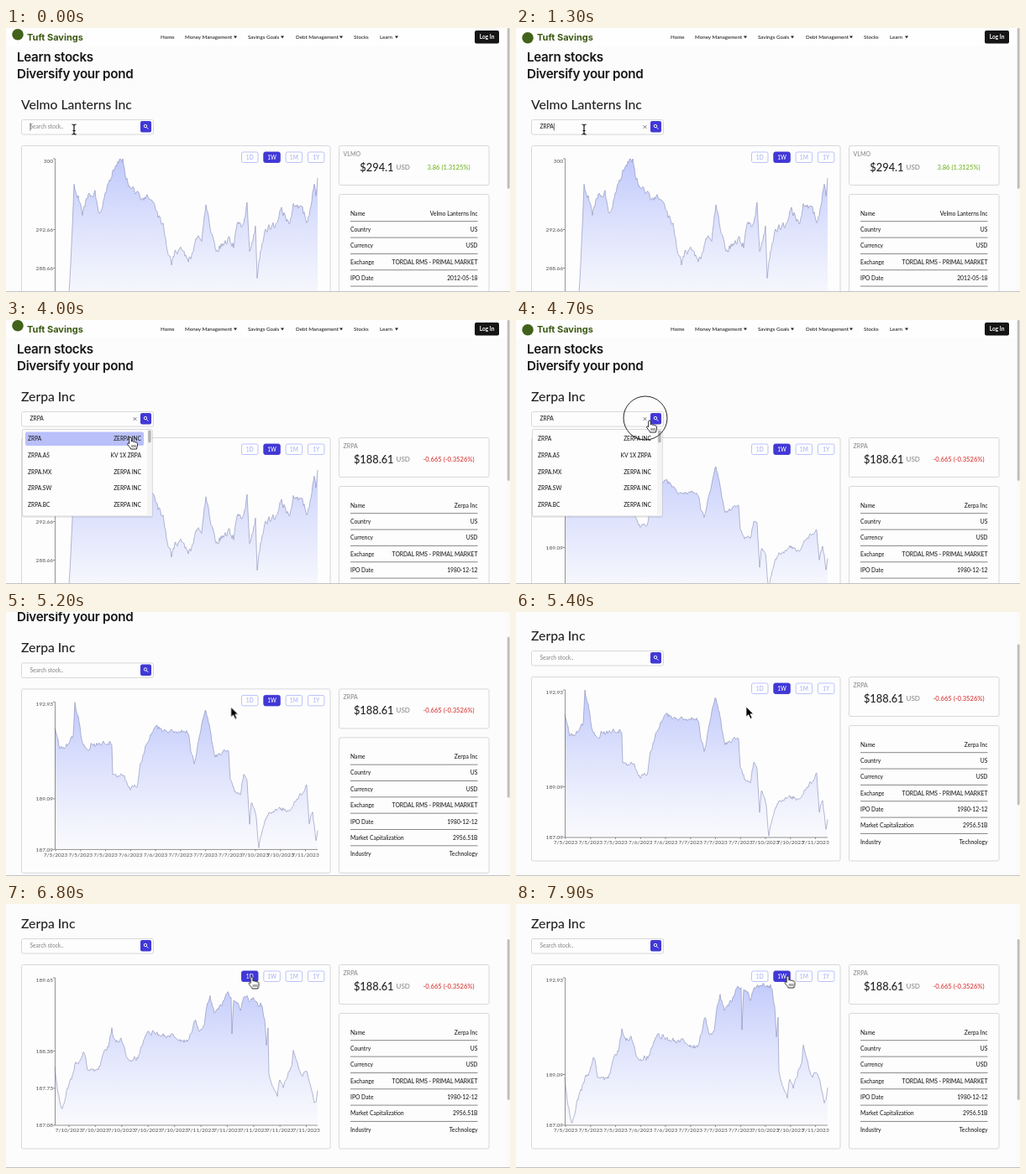
These frames come from a looping animation (600 by 315 pixels, 8000 ms). An HTML page:

```html
<!DOCTYPE html>
<html lang="en">
<head>
<title>Stock search</title>
<style>
  html, body { margin: 0; width: 100%; height: 100%; overflow: hidden; background: #fcfcfc; }
  svg { display: block; width: 600px; height: 315px; font: 500 6.6px Lato, sans-serif; fill: #222; }
  .card { fill: #fdfdfd; stroke: #cfcfd2; stroke-width: .8; }
  .title { font: 600 15.2px Inter, sans-serif; letter-spacing: -.3px; fill: #161616; }
  .brand { font: 700 11px Inter, sans-serif; fill: #3c5a14; }
  .end { text-anchor: end; }
  .mid { text-anchor: middle; }
  .soft { fill: #8a8a8e; }
  .axis { stroke: #666; stroke-width: .7; fill: none; }
  .labels { fill: #5c5c60; font-size: 6.5px; }
  .range rect { fill: #fefefe; stroke: #b5bbfa; stroke-width: .9; }
  .range text { fill: #aab1f8; text-anchor: middle; }
  .range.on rect { fill: #4138d6; stroke: #4138d6; }
  .range.on text { fill: #fff; }

  #page, #thumb, #cursor, #badge { animation: 8s ease-in-out infinite; }
  #page { animation-name: scroll; }
  #thumb { animation-name: thumb; }
  #cursor { animation-name: point; }
  #badge { animation-name: hop; }
  @keyframes scroll {
    0%, 61% { transform: translateY(0); }
    67%, 68.5% { transform: translateY(-63px); }
    70.5%, 100% { transform: translateY(-68px); }
  }
  @keyframes thumb {
    0%, 61% { transform: translateY(0); }
    67%, 68.5% { transform: translateY(38.5px); }
    70.5%, 100% { transform: translateY(42px); }
  }
  @keyframes hop {
    0% { transform: translateY(-4px); }
    2.5% { transform: translateY(-5px); }
    10%, 40% { transform: translateY(0); }
    45% { transform: translateY(-4px); }
    50% { transform: translateY(-5px); }
    58%, 100% { transform: translateY(0); }
  }
  @keyframes point {
    0%, 22% { transform: translate(81px, 121px); }
    31% { transform: translate(176px, 122px); }
    33.5%, 36% { transform: translate(168px, 119px); }
    43% { transform: translate(150px, 138px); }
    46%, 51% { transform: translate(148px, 140px); }
    56% { transform: translate(155px, 117px); }
    58.5%, 60% { transform: translate(159px, 120px); }
    66%, 69% { transform: translate(274px, 113px); }
    74.5%, 93.75% { transform: translate(292.5px, 87px); }
    95.75%, 100% { transform: translate(323.5px, 86px); }
  }
</style>
</head>
<body>
<svg viewBox="0 0 600 315">
  <defs>
    <linearGradient id="fade" gradientUnits="userSpaceOnUse" x1="0" y1="156" x2="0" y2="332">
      <stop offset="0" stop-color="#b9c3fb" stop-opacity=".9"/>
      <stop offset="1" stop-color="#c9d0fc" stop-opacity=".06"/>
    </linearGradient>
  </defs>
  <g id="page">
    <rect width="600" height="22" fill="#fefefe"/>
    <circle id="badge" cx="14" cy="11.8" r="6.8" fill="#41621a"/>
    <text class="brand" x="25" y="15">Tuft Savings</text>
    <g id="nav" font-size="6.2"></g>
    <rect x="558" y="3" width="29" height="15.5" rx="2" fill="#151515"/>
    <text class="mid" x="572.5" y="13.2" font-weight="700" style="fill:#fff">Log In</text>

    <text class="title" x="13" y="39.5">Learn stocks</text>
    <text class="title" x="13" y="59.5">Diversify your pond</text>
    <text id="name" x="18" y="97" font-size="15.7"></text>

    <rect class="card" x="18.5" y="109.5" width="157" height="17.5" rx="2"/>
    <text id="hint" class="soft" x="28.5" y="120.3">Search stock..</text>
    <text id="query" x="28.5" y="120.3"></text>
    <path id="caret" d="M0 113.5v9" stroke="#333" stroke-width=".7"/>
    <path id="clear" d="M151.6 116.1l3.8 3.8m0-3.8l-3.8 3.8" stroke="#444" stroke-width=".7"/>
    <rect x="160" y="111" width="13" height="13.5" rx="2" fill="#4138d6"/>
    <path d="M167.3 118.5l2 2" stroke="#fff" stroke-width="1"/>
    <circle cx="166" cy="117" r="1.7" fill="none" stroke="#fff" stroke-width=".9"/>

    <rect class="card" x="18.5" y="140.5" width="367.5" height="219.5" rx="2"/>
    <path id="area" fill="url(#fade)"/>
    <path id="line" fill="none" stroke="#7c81ae" stroke-width=".55" stroke-linejoin="round"/>
    <path class="axis" d="M58.5 156V332H371"/>
    <path id="ticks" class="axis"/>
    <g id="labels" class="labels"></g>
    <g id="ranges"></g>

    <rect class="card" x="396.5" y="140.5" width="178.5" height="47" rx="2"/>
    <text id="ticker" class="soft" x="401.5" y="152.8" font-size="7"></text>
    <text id="price" class="end" x="461.5" y="171" font-size="12.8"></text>
    <text class="soft" x="464.5" y="169" font-size="8">USD</text>
    <text id="change" class="mid" x="527" y="169" font-size="7.6"></text>
    <rect class="card" x="396.5" y="198.5" width="178.5" height="161.5" rx="2"/>
    <g id="facts" font-size="6.75"></g>

    <g id="menu">
      <rect x="19" y="131" width="156" height="105" rx="2" fill="#000" opacity=".07"/>
      <rect class="card" x="19.5" y="130.5" width="154.5" height="103.5" rx="1.5"/>
      <rect x="168" y="131" width="5.6" height="102.5" fill="#f4f4f4"/>
      <rect x="169.2" y="131.5" width="3.4" height="15" rx="1.7" fill="#b4b4b6"/>
      <rect id="hover" x="23" y="133.5" width="141" height="16.5" rx="2" fill="#b9c0fa"/>
    </g>
  </g>

  <rect x="595.5" width="4.5" height="315" fill="#fafafa"/>
  <rect id="thumb" x="596.8" y="0" width="2.8" height="192" rx="1.4" fill="#bdbdbf"/>
  <rect y="314" width="600" height="1" fill="#c2c2c4"/>
  <circle id="ring" fill="none" stroke="#111" stroke-width=".9"/>
  <g id="cursor">
    <path id="beam" fill="none" stroke="#111" stroke-width="1.2"
      d="M-2.6-6Q0-6 0-4.4Q0-6 2.6-6M0-4.4V4.4M-2.6 6Q0 6 0 4.4Q0 6 2.6 6M-1.6 1.5H1.6"/>
    <g id="hand" fill="#fff" stroke="#111" stroke-width=".9">
      <path d="M-1.3 1.2C-1.3-.6 1.3-.6 1.3 1.2V5C1.8 4.2 3.6 4.4 3.8 5.6C4.5 4.8 6 5 6.2 6.2C7 5.6 8.4 6 8.4 7.4V10C8.4 11.5 7.6 12.3 7.4 14H.6C.2 12.5-1.5 11-3.2 8.6C-4 7.4-2.6 6.2-1.3 7.6Z"/>
      <path d="M2 9v3M4 9v3M6 9v3" stroke-width=".7"/>
    </g>
    <path id="arrow" d="M0 0V12.2L2.8 9.6L5 14.4L7.2 13.4L5 8.8H8.8Z" fill="#000" stroke="#fff" stroke-width=".8"/>
  </g>
</svg>
<script>
const LOOP = 8000, MORPH = 1300, LEFT = 58, RIGHT = 371, TOP = 156, BASE = 332;
const $ = id => document.getElementById(id);
const show = (id, on) => { $(id).style.display = on ? '' : 'none'; };
const latest = (list, t) => list.findLastIndex(v => v.at <= t);

function add(parent, tag, attrs, text) {
  const el = document.createElementNS('http://www.w3.org/2000/svg', tag);
  for (const k in attrs) el.setAttribute(k, attrs[k]);
  if (text) el.textContent = text;
  return parent.appendChild(el);
}

// Fixed parts
[['Home', 184], ['Money Management', 213, 271], ['Savings Goals', 288, 327],
 ['Debt Management', 345, 397], ['Stocks', 414], ['Learn', 445, 463]].forEach(([label, x, arrow]) => {
  add($('nav'), 'text', { x, y: 13.2 }, label);
  if (arrow) add($('nav'), 'path', { d: `M${arrow} 9.6h4l-2 3z` });
});

const buttons = ['1D', '1W', '1M', '1Y'].map((label, i) => {
  const x = 280.5 + i * 26.3, g = add($('ranges'), 'g', {});
  add(g, 'rect', { x, y: 148, width: 19.5, height: 12.5, rx: 2 });
  add(g, 'text', { x: x + 9.75, y: 156.6 }, label);
  return g;
});

const facts = [['Name'], ['Country', 'US'], ['Currency', 'USD'], ['Exchange', 'TORDAL RMS - PRIMAL MARKET'],
  ['IPO Date'], ['Market Capitalization', '2956.51B'], ['Industry', 'Technology']].map(([label, value], i) => {
  const y = 223.7 + i * 19.35;
  add($('facts'), 'text', { x: 410, y }, label);
  if (i < 6) add($('facts'), 'path', { d: `M410 ${y + 7}H561.5`, stroke: '#555', 'stroke-width': .7 });
  return add($('facts'), 'text', { x: 561.5, y, class: 'end' }, value);
});

['', '.AS', '.MX', '.SW', '.BC'].forEach((suffix, i) => {
  const y = 144.3 + i * 19.6;
  add($('menu'), 'text', { x: 26, y }, 'ZRPA' + suffix);
  add($('menu'), 'text', { x: 161, y, class: 'end' }, i === 1 ? 'KV 1X ZRPA' : 'ZERPA INC');
});

// Price curves: a few turning points plus seeded jitter, one sample per pixel
function curve(seed, jitter, pts) {
  const rand = () => (seed = (seed * 16807) % 2147483647) / 2147483647 - .5;
  const ys = [];
  let k = 0, noise = 0;
  for (let x = LEFT; x <= RIGHT; x++) {
    while (k < pts.length - 4 && x > pts[k + 2]) k += 2;
    const [x0, y0, x1, y1] = pts.slice(k, k + 4);
    noise = noise * .35 + rand() * jitter;
    const y = y0 + (y1 - y0) * (x - x0) / (x1 - x0) + noise;
    ys.push(Math.min(BASE, Math.max(TOP, y)));
  }
  return ys;
}

const velmo = curve(41, 7, [
  58,332, 75,318, 79,240, 81,190, 86,202, 91,220, 97,200, 106,196, 111,222, 116,206, 121,190, 126,174,
  131,164, 139,156, 142,176, 148,190, 155,196, 161,206, 167,200, 175,206, 180,222, 187,236, 191,258,
  197,283, 201,268, 208,266, 217,276, 222,270, 226,248, 233,250, 238,212, 245,246, 250,265, 266,252,
  271,260, 275,230, 283,236, 287,208, 290,268, 297,238, 299,303, 303,264, 308,246, 313,238, 322,234,
  327,214, 337,234, 342,213, 352,212, 358,232, 364,208, 367,184, 369,200, 371,181]);
const week = curve(77, 5, [
  58,188, 64,210, 73,206, 80,196, 82,156, 84,170, 87,178, 90,202, 98,217, 101,208, 126,204, 127,241,
  132,245, 138,242, 148,259, 156,256, 160,232, 166,210, 173,194, 180,186, 188,190, 217,191, 220,212,
  224,228, 230,200, 234,178, 238,165, 243,188, 248,220, 265,214, 267,246, 273,264, 279,268, 283,241,
  287,250, 290,300, 292,275, 298,292, 301,331, 305,308, 313,290, 325,283, 336,286, 350,268, 358,255,
  361,300, 365,288, 369,322, 371,311]);
const day = curve(19, 6, [
  58,280, 62,313, 67,332, 70,318, 76,296, 84,276, 88,270, 92,248, 97,273, 104,279, 110,278, 117,253,
  122,244, 126,220, 131,232, 137,224, 142,245, 149,253, 158,250, 163,234, 170,224, 180,231, 202,233,
  210,240, 217,238, 222,217, 225,203, 231,226, 236,218, 239,192, 243,178, 248,192, 257,184, 263,168,
  268,162, 269,215, 271,166, 279,178, 285,163, 297,161, 305,163, 308,190, 310,225, 312,203, 313,265,
  318,285, 323,297, 326,278, 330,290, 335,270, 340,258, 342,234, 346,252, 352,272, 360,273, 367,308,
  371,288]);

const dates = (list, first, gap) => list.map((d, i) => [`7/${d}/2023`, first + i * gap]);
const weekView = {
  range: 1, ys: week,
  y: [['192.93', TOP], ['189.09', 271.5], ['187.09', BASE]],
  x: dates([5, 5, 5, 6, 6, 7, 7, 7, 10, 10, 11], 59, 29.75)
};
const views = [
  { at: 0, range: 1, ys: velmo, y: [['300', TOP], ['292.66', 240.5], ['288.66', 286.5], ['284.66', BASE]], x: [] },
  { at: 4050, ...weekView },
  { at: 6100, range: 0, ys: day,
    y: [['189.65', TOP], ['188.38', 243.5], ['187.73', 287.8], ['187.08', BASE]],
    x: dates([10, 10, 10, 10, 10, 11, 11, 11, 11, 11], 75, 31.4) },
  { at: 7850, ...weekView }
];
const stocks = [
  { at: 0, name: 'Velmo Lanterns Inc', ticker: 'VLMO', price: '$294.1', change: '3.86 (1.3125%)', color: '#6fb21f', ipo: '2012-05-18' },
  { at: 3900, name: 'Zerpa Inc', ticker: 'ZRPA', price: '$188.61', change: '-0.665 (-0.3526%)', color: '#d8322f', ipo: '1980-12-12' }
];
const keys = [700, 900, 1100, 1300];
const cursors = [{ at: 0, id: 'beam' }, { at: 2250, id: 'hand' }, { at: 4850, id: 'arrow' }, { at: 5900, id: 'hand' }];
const clicks = [[2690, 168, 119], [3700, 148, 140], [4500, 154, 117], [5940, 292, 87], [7640, 323, 87]];

function setStock(s) {
  for (const id of ['name', 'ticker', 'price', 'change']) $(id).textContent = s[id];
  $('change').style.fill = s.color;
  facts[0].textContent = s.name;
  facts[4].textContent = s.ipo;
}

function setView(v) {
  $('labels').replaceChildren();
  v.y.forEach(([s, y]) => add($('labels'), 'text', { x: 56, y: Math.max(158.5, y) + 2.3, class: 'end' }, s));
  v.x.forEach(([s, x]) => add($('labels'), 'text', { x, y: 340.3, class: 'mid' }, s));
  $('ticks').setAttribute('d',
    v.y.map(([, y]) => `M56 ${y}h2.5`).join('') + v.x.map(([, x]) => `M${Math.max(LEFT, x)} ${BASE}v2`).join(''));
  buttons.forEach((b, i) => b.setAttribute('class', i === v.range ? 'range on' : 'range'));
}

// The standard "ease" curve, solved by bisection
function ease(x) {
  const bez = (a, b, s) => 3 * (1 - s) ** 2 * s * a + 3 * (1 - s) * s * s * b + s ** 3;
  let lo = 0, hi = 1;
  for (let i = 0; i < 20; i++) {
    const s = (lo + hi) / 2;
    if (bez(.25, .25, s) < x) lo = s; else hi = s;
  }
  return bez(.1, 1, lo);
}

let stockNow = -1, viewNow = -1;

function draw(t) {
  const s = latest(stocks, t), v = latest(views, t);
  if (s !== stockNow) setStock(stocks[stockNow = s]);
  if (v !== viewNow) setView(views[viewNow = v]);

  const to = views[v].ys, from = views[Math.max(0, v - 1)].ys;
  const p = ease(Math.min(1, (t - views[v].at) / MORPH));
  const d = 'M' + to.map((y, i) => `${LEFT + i} ${(from[i] + (y - from[i]) * p).toFixed(1)}`).join('L');
  $('line').setAttribute('d', d);
  $('area').setAttribute('d', `${d}V${BASE}H${LEFT}Z`);

  const query = t < 4780 ? 'ZRPA'.slice(0, keys.filter(k => k <= t).length) : '';
  $('query').textContent = query;
  show('hint', !query);
  show('clear', query);
  show('caret', t < 2690 && t % 1000 < 500);
  $('caret').setAttribute('transform', `translate(${29 + (query ? $('query').getComputedTextLength() : 0)})`);
  show('menu', t >= 2950 && t < 4780);
  show('hover', t >= 3380 && t < 4250);

  const shape = cursors[latest(cursors, t)].id;
  for (const id of ['beam', 'hand', 'arrow']) show(id, id === shape);

  const click = clicks.find(([at]) => t >= at && t < at + 250);
  show('ring', click);
  if (click) {
    const [at, cx, cy] = click;
    $('ring').setAttribute('cx', cx);
    $('ring').setAttribute('cy', cy);
    $('ring').setAttribute('r', (t - at) * .13);
  }
}

let start;
function tick(now) {
  start ??= now;
  draw((now - start) % LOOP);
  requestAnimationFrame(tick);
}
draw(0);
requestAnimationFrame(tick);
</script>
</body>
</html>
```
